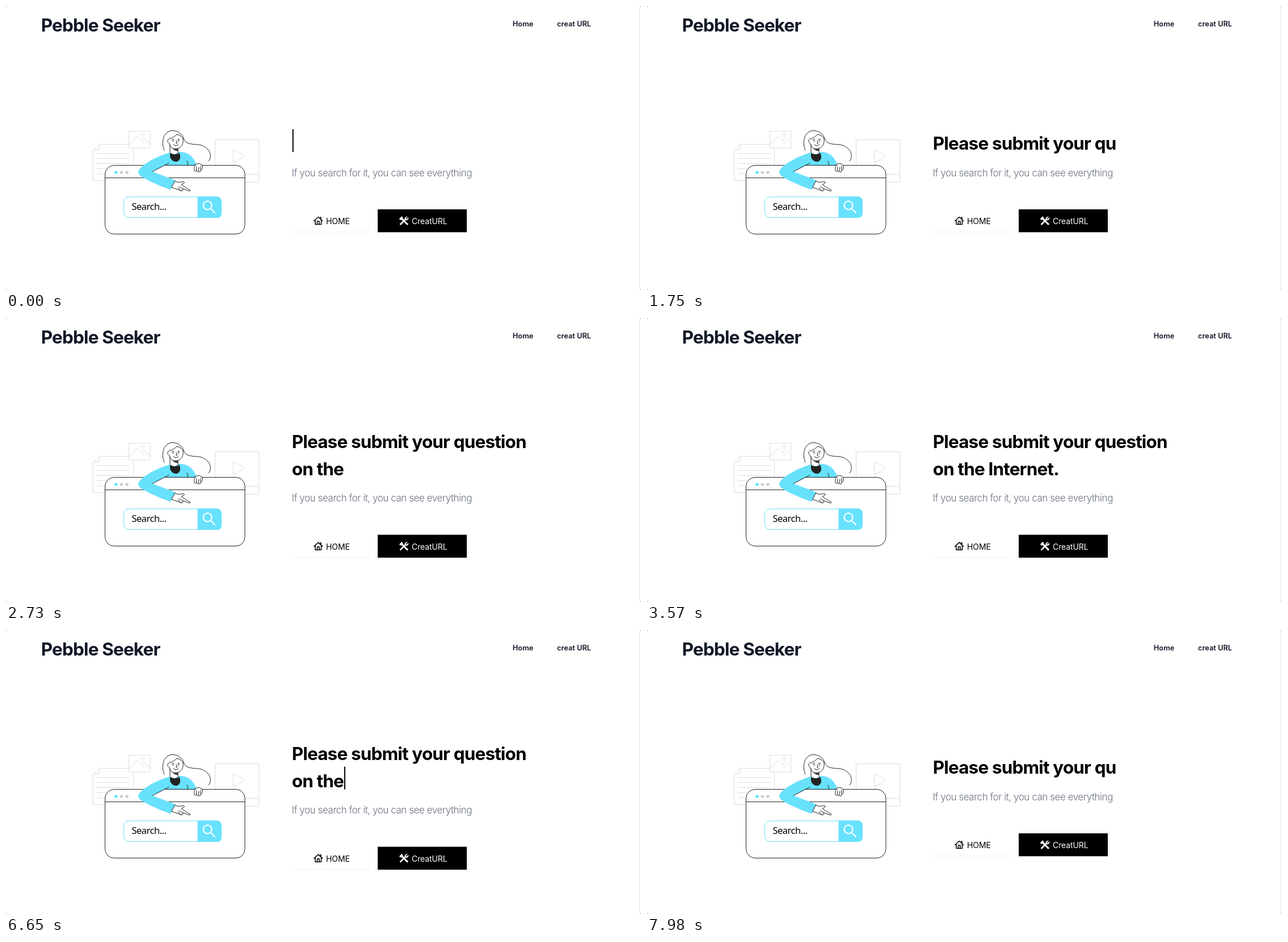
An HTML page for the animation above (8000 ms loop, 1119x500 px).

```html
<!DOCTYPE html>
<html lang="en">
<head>
<meta charset="utf-8">
<title>Search landing page</title>
<style>
  html, body { margin: 0; width: 100%; height: 100%; overflow: hidden; background: #888; }
  svg { display: block; }
  text { font-family: Inter, sans-serif; font-optical-sizing: none; white-space: pre; }
  .title { font-size: 31.5px; font-weight: 700; letter-spacing: -.85px; }
  .nav { font-size: 12.8px; font-weight: 600; fill: #111827; }
  .lead { font-size: 17px; font-weight: 350; letter-spacing: -.45px; fill: #6b7280; }
  .button { font-size: 14px; letter-spacing: -.1px; }
  .field { font: 16.5px "Noto Sans", sans-serif; letter-spacing: -.5px; }
  .line { fill: none; stroke: #222; stroke-width: 1; stroke-linecap: round; stroke-linejoin: round; }
  .faint { fill: none; stroke: #ddd; stroke-width: 1; stroke-linejoin: round; }
  .white { fill: #fff; }
  .cyan { fill: #68e1fd; }
</style>
</head>
<body>
<svg width="1119" height="500" viewBox="0 0 1119 500">
  <rect class="white" width="1119" height="500" rx="3"/>
  <path d="M1116.5 0V500" stroke="#e5e5e5"/>

  <text class="title" x="61.8" y="44.5" fill="#111827">Pebble Seeker</text>
  <text class="nav" x="892.8" y="36.4">Home</text>
  <text class="nav" x="971" y="36.4">creat URL</text>

  <!-- papers and media behind the window -->
  <g class="faint">
    <path d="M174 307.5H153.5V254L164 243.5H224.5V280M164 243.5V253.5H153.5"/>
    <path d="M160 259.5H218M160 268.5H218M160 277.5H218M160 286.5H174M160 295.5H174"/>
    <rect class="white" x="216.5" y="220.5" width="37.5" height="29.5"/>
    <path d="M217 244L229 231Q231 229 233 231L244 242M238 237L242 234Q244 233 246 235L253 242"/>
    <circle cx="241" cy="227" r="2.5"/>
    <rect x="368.5" y="235.5" width="77" height="74.5"/>
    <path d="M421 296.5H445M400.5 255Q400.5 253 402.5 254L419.5 263.5Q421.5 264.7 419.5 266L402.5 275Q400.5 276 400.5 274Z"/>
  </g>

  <!-- head and shoulders -->
  <path class="line white" d="M279 254C273 240 277 221 292 219.500C303 219 310 225 313 233C316 243 325 243 338 244C352 245 362 256 360 266Q359.500 271 357 273"/>
  <path class="cyan" d="M258 282L288 258Q298 255 309 257C322 258 331 266 336 281Z"/>
  <path class="white" d="M289 244H304V258Q296 264 289 258Z"/>
  <path class="line white" d="M301 226C296 231 291 233 287 234C284 235 284 241 288 242C289 250 296 253 302 251C309 249 313 243 312 234Q310 228 301 226"/>
  <path class="line" stroke-width=".8" d="M289 244V258M303 251V258M292 235Q294 233.500 296 235M302 235Q304 233.500 306 235M300 237L301.500 241.500H299.500M295 244Q300 248 304 243.500"/>
  <circle cx="294.5" cy="237.5" r=".9"/><circle cx="304" cy="237.5" r=".9"/>
  <path d="M293 250.5Q298 253.5 303 251.5V255Q297 255 293 250.5Z" fill="#222"/>
  <path d="M288.5 258Q296 264 305 258.5C309 265 307 272 301 274C293 275 287 267 288.5 258Z" fill="#222"/>

  <!-- browser window -->
  <rect class="line white" x="174.5" y="280.5" width="246.5" height="121" rx="16"/>
  <path class="line" d="M174.5 302.5H421"/>
  <circle class="cyan" cx="194" cy="293" r="2.8"/>
  <circle cx="203.5" cy="293" r="2.8" fill="#ccc"/>
  <circle cx="213" cy="293" r="2.8" fill="#ccc"/>

  <!-- search box -->
  <rect x="207.5" y="336" width="172" height="36.5" rx="9" fill="#fff" stroke="#68e1fd"/>
  <path class="cyan" d="M337.5 335.5H371Q380 335.5 380 345V364Q380 373 371 373H337.5Z"/>
  <text class="field" x="221.5" y="359">Search...</text>
  <g fill="none" stroke="#fff" stroke-width="2.2" stroke-linecap="round">
    <circle cx="355" cy="351" r="7.5"/>
    <path d="M360.5 356.5L368 364"/>
  </g>

  <!-- arm and hands -->
  <path class="cyan" d="M289 258C268 263 240 279 234 289C231 294 235 299 243 303Q265 315 290 323.5L299 307L258 291.5L289 276Z"/>
  <path class="line" d="M258 291.5L287 276.5M319 273Q321 276 320.5 280"/>
  <path class="line white" d="M298 308Q303 312 309 309.5Q315 309 314.5 311Q312 313 309 314.5Q314 318 325 324.5Q325 326.5 322 325.5L311 321.5Q313 325.5 310 325.5Q306 326 303 323L292 319.5Z"/>
  <path class="line" d="M305 318L311 321.5M303 320L308 325"/>
  <path class="line white" d="M334 279Q340 275.5 344 279Q348 283 346 287Q344.5 290 343 287V291Q341 294 339 290.5Q337.5 294 335.5 290Q332.5 292.5 331.5 288.5Q332 283 334 279Z"/>
  <path class="line" d="M336 283L335.5 290M340 284L339 290.5M343 282V287"/>

  <!-- typed heading -->
  <text class="title" id="first" x="503.7"></text>
  <text class="title" id="second" x="503.7"></text>
  <rect id="cursor" width="2" height="40"/>

  <!-- content that moves down when the heading wraps -->
  <g id="below">
    <text class="lead" x="503.5" y="299.5">If you search for it, you can see everything</text>
    <path d="M504 398H640" stroke="#eee"/>
    <g class="line" style="stroke:#000;stroke-width:1.5">
      <path d="M542.8 378.5L550.2 371.5L557.6 378.5M545 377V384.5H555.5V377M555 376V372H553.5M548.5 384V379H552V384"/>
    </g>
    <text class="button" x="564" y="384">HOME</text>
    <rect x="655" y="358" width="157" height="40.3"/>
    <g fill="none" stroke="#fff">
      <path d="M694.5 385L704 375.5" stroke-width="2.6"/>
      <path d="M707.5 371L704.5 374L706 375.5L709 372.5Q709.5 376 706.5 377Q703.5 377.5 702.8 374.5Q703 371 707.5 371Z" fill="#fff" stroke-width=".5"/>
      <path d="M700.5 377.5L708 385" stroke-width="3"/>
      <path d="M694 376L698.5 371.5M696.5 373.5L700.5 377.5" stroke-width="3.2"/>
    </g>
    <text class="button" x="715" y="384" fill="#fff">CreatURL</text>
  </g>
</svg>
<script>
const LOOP = 8000, TICK = 70;
const HEADING = 'Please submit your question on the Internet.';
const FIRST_LINE = HEADING.indexOf('on the');  // letters on line one once wrapped
const FITS = FIRST_LINE + 1;                   // most letters that stay on a single line
const LINE = 47.25, LEFT = 503.7;
const [first, second, cursor, below] =
  ['first', 'second', 'cursor', 'below'].map(id => document.getElementById(id));

// Number of evenly spaced keystrokes made by time t
const strokes = (t, start, interval) => Math.max(0, Math.floor((t - start) / interval) + 1);

function draw(time) {
  const t = Math.floor(time % LOOP / TICK) * TICK;
  const typed = Math.min(HEADING.length, strokes(t, 237.4, 75.2));
  const count = Math.max(0, typed - strokes(t, 5634.8, 105.2));
  const wrapped = count > FITS;
  const shift = wrapped ? LINE / 2 : 0;
  const split = wrapped ? FIRST_LINE : count;

  first.textContent = HEADING.slice(0, split);
  second.textContent = HEADING.slice(split, count);
  first.setAttribute('y', 253 - shift);
  second.setAttribute('y', 253 + shift);
  below.setAttribute('transform', `translate(0 ${shift})`);

  const last = wrapped ? second : first;
  cursor.setAttribute('x', LEFT + 1 + last.getComputedTextLength());
  cursor.setAttribute('y', 217 + shift);
  cursor.setAttribute('visibility', (t + 70) % 1050 < 490 ? 'visible' : 'hidden');
}

const start = performance.now();
function loop(now) {
  draw(Math.max(0, now - start));
  requestAnimationFrame(loop);
}
draw(0);
requestAnimationFrame(loop);
</script>
</body>
</html>
```
